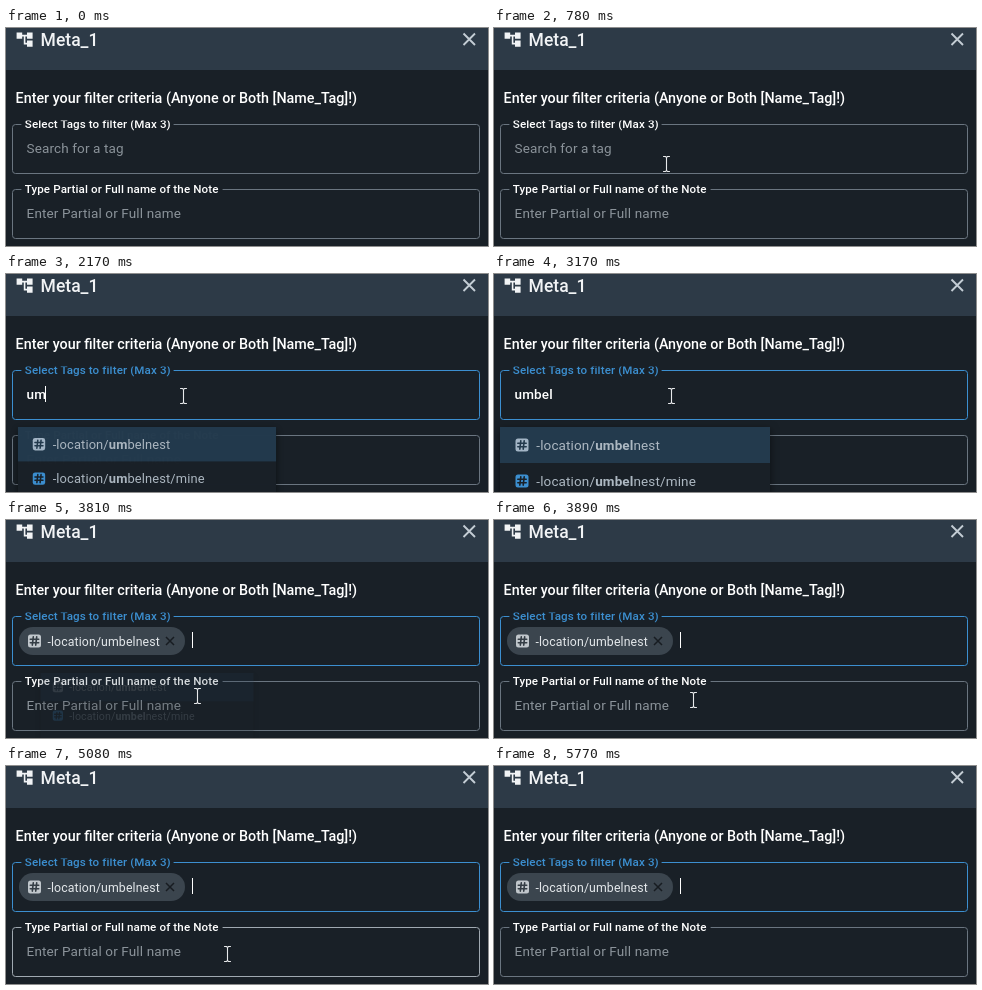
Write an HTML page that moves like this. It is 482 by 218 pixels and loops after 5800 ms.

```html
<!DOCTYPE html>
<html lang="en">
<head>
<meta charset="utf-8">
<title>Filter dialog</title>
<style>
  html, body { margin: 0; width: 100%; height: 100%; overflow: hidden; background: #192027; }
  svg { display: block; width: 482px; height: 218px; }
  text { font-family: Roboto, Arial, sans-serif; font-size: 13.5px; letter-spacing: .00938em; white-space: pre; }
  .label { font-size: 11.6px; font-weight: 500; }
  .hint { fill: #8b939a; }
  .typed { fill: #fff; font-weight: 500; }
  .option { fill: #adb8c2; }
  .option .match { font-weight: 700; }
  .line { fill: none; stroke-linecap: round; }
  #menu { filter: drop-shadow(0 3px 4px #0008); }
</style>
</head>
<body>
<svg viewBox="0 0 482 218">
  <defs>
    <clipPath id="content"><rect y="92.5" width="482" height="126"/></clipPath>
    <path id="hash" class="line" d="M-1.2-4.2-2.2 4.2M2.2-4.2 1.2 4.2M-4.2-1.7H4.2M-4.2 1.7H4.2" stroke-width="1.6"/>
  </defs>

  <rect width="482" height="42" fill="#2d3a47"/>
  <path transform="translate(9 2) scale(.8)" fill="#f1f3f5" d="M22 11V3h-7v3H9V3H2v8h7V8h2v10h4v3h7v-8h-7v3h-2V8h2v3z"/>
  <text x="34.6" y="17.5" fill="#f1f3f5" style="font-size:17.5px;font-weight:500;letter-spacing:0">Meta_1</text>
  <path d="M457.500 5.500l11.500 11.500m0-11.500l-11.500 11.500" stroke="#c3ccd4" stroke-width="1.900"/>
  <text x="9.6" y="75" fill="#fff" style="font-size:14.320px;font-weight:500;letter-spacing:0">Enter your filter criteria (Anyone or Both [Name_Tag]!)</text>

  <path id="tagBox" class="line"/>
  <g clip-path="url(#content)"><text id="tagLabel" class="label" x="18.8" y="100">Select Tags to filter (Max 3)</text></g>
  <text id="tagText" x="20.6" y="125"></text>
  <g id="chip">
    <rect x="13" y="107" width="166" height="28" rx="14" fill="#3b454e"/>
    <rect x="22" y="114.500" width="13" height="13" rx="2.500" fill="#c0c6cb"/>
    <use href="#hash" x="28.5" y="121" stroke="#343d45"/>
    <text x="41.5" y="125.500" fill="#e4e8eb" style="font-size:12.300px">-location/umbelnest</text>
    <path d="M160 117l8 8m0-8l-8 8" stroke="#171c21" stroke-width="1.500"/>
  </g>
  <rect id="caret" y="112" width="1" height="16" fill="#fff"/>

  <path id="nameBox" class="line"/>
  <text class="label" x="18.8" y="164.600" fill="#fff">Type Partial or Full name of the Note</text>
  <text class="hint" x="20.6" y="190">Enter Partial or Full name</text>

  <g id="menu">
    <rect x="6" y="153" width="270" height="90" fill="#192027"/>
    <rect x="6" y="153" width="270" height="36" fill="#233a4d"/>
    <rect x="21.500" y="164.500" width="13" height="13" rx="2.500" fill="#a3b5c6"/>
    <use href="#hash" x="28" y="171" stroke="#233a4d"/>
    <text class="option" x="42.3" y="176"></text>
    <rect x="21.500" y="200.500" width="13" height="13" rx="2.500" fill="#3c8fd0"/>
    <use href="#hash" x="28" y="207" stroke="#192027"/>
    <text class="option" x="42.3" y="212"></text>
  </g>

  <g id="pointer">
    <path id="iBeam" class="line" d="M-3-7.500H-1L0-6.500 1-7.500H3M0-6.500V6.500M-3 7.500H-1L0 6.500 1 7.500H3" stroke="#e8eaec" stroke-width="1.100"/>
    <path id="arrow" d="M0 0V13.500L3.200 10.500 5.400 15.500 7.300 14.600 5.100 9.800H9.500Z" fill="#fff" stroke="#111" stroke-width=".8"/>
    <path id="hand" d="M-1 0Q0-1.500 1 0V5L7 6.500Q8.500 7 8 9L7 15H0L-4.500 9Q-4 7-1 9Z" fill="#fff" stroke="#111" stroke-width=".8"/>
  </g>
</svg>
<script>
const LOOP = 5800, FOCUS = 1070, PICK = 3720, BLINK = 510, HOVER_LAG = 100;
const WORD = "umbelnest";
const KEYS = [2010, 2120, 2300, 2510, 2660];
const REST = "#6a7580", HOVER = "#a0a9b1", BLUE = "#3c8fd0";
// time, x, y
const PATH = [
  [380, 158, 222], [780, 172, 136], [910, 175, 126], [990, 175, 126], [1240, 177, 122],
  [3330, 177, 122], [3560, 181, 172], [PICK, 181, 172], [3890, 199, 180], [4020, 200, 180],
  [4550, 200, 180], [5110, 222, 188], [5160, 222, 188], [5300, 245, 200]
];

const el = id => document.getElementById(id);
const set = (id, name, value) => el(id).setAttribute(name, value);
const show = (id, on) => set(id, "visibility", on ? "visible" : "hidden");
const clamp = p => Math.max(0, Math.min(1, p));
const easeOut = p => 1 - (1 - clamp(p)) ** 2;
const inTag = p => p && p.y > 96 && p.y < 146;
const inName = p => p && p.y > 161 && p.y < 211;

// Rounded outline with a gap for the label in its top edge
const outline = (top, gapEnd) =>
  `M15 ${top}H9.500a3 3 0 0 0-3 3v43a3 3 0 0 0 3 3H470.500a3 3 0 0 0 3-3v-43a3 3 0 0 0-3-3H${gapEnd}`;

function pointerAt(t) {
  const i = PATH.findIndex(p => p[0] > t);
  if (i < 1) return null;
  const [t0, x0, y0] = PATH[i - 1], [t1, x1, y1] = PATH[i];
  const p = (t - t0) / (t1 - t0);
  return { x: x0 + (x1 - x0) * p, y: y0 + (y1 - y0) * p };
}

function drawMenu(t, typed) {
  const open = t < PICK ? easeOut((t - 2020) / 260) : 1 - easeOut((t - PICK) / 150);
  const s = .75 + .25 * open;
  show("menu", open > 0);
  set("menu", "opacity", Math.min(1, open * 1.2));
  set("menu", "transform", `translate(141 153) scale(${s}) translate(-141 -153)`);
  document.querySelectorAll(".option").forEach((row, i) => {
    row.innerHTML = `-location/<tspan class="match">${typed}</tspan>${WORD.slice(typed.length)}${i ? "/mine" : ""}`;
  });
}

function draw(t) {
  const focused = t >= FOCUS, picked = t >= PICK;
  const typed = WORD.slice(0, KEYS.filter(k => k <= t).length);
  const at = pointerAt(t), hovered = pointerAt(t - HOVER_LAG);
  const onMenu = at && at.y > 153 && t > 3330 && !picked;
  const hoverName = inName(hovered) && (!focused || t >= 3940);

  set("tagBox", "stroke", focused ? BLUE : inTag(hovered) ? HOVER : REST);
  set("nameBox", "stroke", hoverName ? HOVER : REST);
  set("tagLabel", "fill", focused ? BLUE : "#fff");

  const text = el("tagText");
  text.textContent = picked ? "" : typed || "Search for a tag";
  text.setAttribute("class", typed ? "typed" : "hint");
  show("chip", picked);

  const lastInput = [FOCUS, ...KEYS, PICK].filter(k => k <= t).pop();
  show("caret", focused && Math.floor((t - lastInput) / BLINK) % 2 === 0);
  set("caret", "x", picked ? 186 : Math.floor(20 + (typed && text.getComputedTextLength())));

  drawMenu(t, typed);

  const beam = (inTag(at) || inName(at)) && !onMenu;
  show("iBeam", at && beam);
  show("hand", at && onMenu);
  show("arrow", at && !beam && !onMenu);
  if (at) set("pointer", "transform", `translate(${Math.round(at.x) + .5} ${Math.round(at.y)})`);
}

set("tagBox", "d", outline(96.5, 168));
set("nameBox", "d", outline(161.5, 217));

const start = performance.now();
function tick() {
  draw((performance.now() - start) % LOOP);
  requestAnimationFrame(tick);
}
tick();
</script>
</body>
</html>
```
